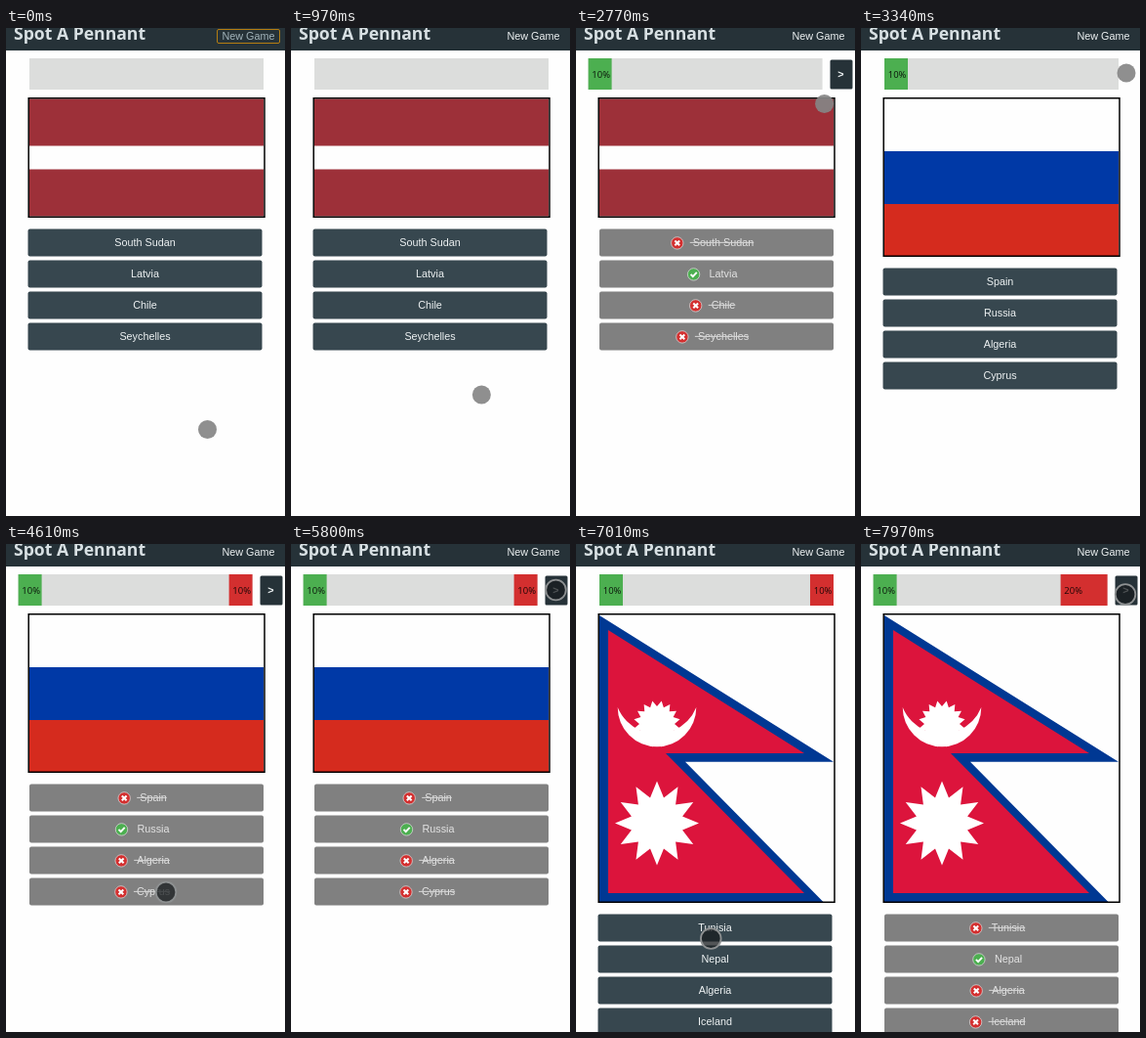
Write an HTML page with a canvas that moves like this. It is 286 by 499 pixels and loops after 8 s.

```html
<!DOCTYPE html>
<html lang="en">
<head>
<meta charset="utf-8">
<title>Flag quiz</title>
<style>
  html, body { margin: 0; width: 100%; height: 100%; overflow: hidden; background: #fefefe; }
  canvas { display: block; width: 286px; height: 499px; }
</style>
</head>
<body>
<canvas id="stage"></canvas>
<script>
const LOOP = 8000;
const HOLD = 250;      // a press stays dark this long, then the pointer leaves
const SETTLE = 130;    // the pointer rests this long before a press
const RESPONSE = 130;  // the page reacts this long after a press
const SANS = '10.8px "Liberation Sans", Arial, sans-serif';
const SMALL = '9.5px "Open Sans", sans-serif';
const GREEN = '#4caf50', RED = '#d32f2f', DARK = '#263238', LIGHT = '#eef2f3';
const FLAG_TOP = 71;

const canvas = document.getElementById('stage');
const ctx = canvas.getContext('2d');
const ratio = window.devicePixelRatio || 1;
canvas.width = 286 * ratio;
canvas.height = 499 * ratio;
ctx.scale(ratio, ratio);

const questions = [
  { flag: drawLatvia, height: 123, names: ['South Sudan', 'Latvia', 'Chile', 'Seychelles'], pick: 'Latvia', correct: 'Latvia' },
  { flag: drawRussia, height: 163, names: ['Spain', 'Russia', 'Algeria', 'Cyprus'], pick: 'Cyprus', correct: 'Russia' },
  { flag: drawNepal, height: 296, names: ['Tunisia', 'Nepal', 'Algeria', 'Iceland'], pick: 'Tunisia', correct: 'Nepal' }
];

// Presses alternate between an answer and the next button.
const presses = [
  { at: 1940, x: 157, y: 254 }, { at: 3090, x: 272, y: 46 },
  { at: 4460, x: 164, y: 356 }, { at: 5690, x: 271.5, y: 47 },
  { at: 7000, x: 138.3, y: 403.5 }, { at: 7960, x: 271, y: 51.5 }
];
const stops = [{ at: -HOLD, x: 206.5, y: 410.5 }, { at: 440, x: 202.5, y: 397.5 }, ...presses];

function pointerAt(time) {
  const from = stops.filter(stop => stop.at <= time).pop();
  const to = stops.find(stop => stop.at > time) || from;
  const start = from.at + HOLD, end = to.at - SETTLE;
  const p = Math.min(1, Math.max(0, (time - start) / (end - start)));
  const ease = p * p * (3 - 2 * p);
  return [from.x + (to.x - from.x) * ease, from.y + (to.y - from.y) * ease];
}

function rect(x, y, w, h, color, radius = 0) {
  ctx.fillStyle = color;
  ctx.beginPath();
  ctx.roundRect(x, y, w, h, radius);
  ctx.fill();
}

function frame(x, y, w, h, color, width, radius = 0) {
  ctx.strokeStyle = color;
  ctx.lineWidth = width;
  ctx.beginPath();
  ctx.roundRect(x, y, w, h, radius);
  ctx.stroke();
}

function text(value, x, y, font, color, align = 'left') {
  ctx.font = font;
  ctx.fillStyle = color;
  ctx.textAlign = align;
  ctx.fillText(value, x, y);
}

function line(points, color, width) {
  ctx.strokeStyle = color;
  ctx.lineWidth = width;
  ctx.beginPath();
  points.forEach(([x, y]) => ctx.lineTo(x, y));
  ctx.stroke();
}

function polygon(points, color) {
  ctx.fillStyle = color;
  ctx.beginPath();
  points.forEach(([x, y]) => ctx.lineTo(x, y));
  ctx.fill();
}

function circle(x, y, r, fill, stroke, width) {
  ctx.beginPath();
  ctx.arc(x, y, r, 0, Math.PI * 2);
  ctx.fillStyle = fill;
  ctx.fill();
  if (stroke) {
    ctx.strokeStyle = stroke;
    ctx.lineWidth = width;
    ctx.stroke();
  }
}

function star(x, y, outer, inner, rays, turn = 0) {
  const points = Array.from({ length: rays * 2 }, (_, i) => {
    const angle = (i + turn) * Math.PI / rays - Math.PI / 2, r = i % 2 ? inner : outer;
    return [x + r * Math.cos(angle), y + r * Math.sin(angle)];
  });
  polygon(points, '#fff');
}

function drawLatvia() {
  rect(24, 72.5, 240, 48, '#9d3039');
  rect(24, 144.4, 240, 48, '#9d3039');
}

function drawRussia() {
  rect(24, 126, 240, 54, '#0039a6');
  rect(24, 180, 240, 53, '#d52b1e');
}

// Crescent with horns level with the outer circle's centre.
function crescent(x, y, radius, depth) {
  const inner = (radius * radius + depth * depth) / (2 * depth);
  const spread = Math.asin(radius / inner);
  ctx.fillStyle = '#fff';
  ctx.beginPath();
  ctx.arc(x, y, radius, 0, Math.PI);
  ctx.arc(x, y + depth - inner, inner, Math.PI / 2 + spread, Math.PI / 2 - spread, true);
  ctx.fill();
}

function drawNepal() {
  polygon([[24, 73], [264, 222.7], [112, 222.7], [253.5, 366], [24, 366]], '#003893');
  polygon([[33, 88], [234, 214], [92, 214], [234, 357], [33, 357]], '#dc143c');
  crescent(83, 167, 40.3, 27);
  star(83, 184, 24, 18, 16, 1);
  star(83, 285.5, 43, 27, 12);
}

function drawHeader(focused) {
  rect(0, 0, 286, 23, DARK);
  text('Spot A Pennant', 8, 12, 'bold 17.6px "Open Sans", sans-serif', '#d8e0e3');
  text('New Game', 248.5, 12, SANS, focused ? '#a3b4bb' : LIGHT, 'center');
  if (focused) frame(216.5, 1.5, 64, 14, '#b47d12', 1, 1.5);
}

function drawProgress(good, bad, answered) {
  const x = answered ? 12.6 : 24, badX = x + 240 - bad * 24;
  rect(x, 31, 240, 32, '#dcdddc');
  if (good) {
    rect(x, 31, good * 24, 32, GREEN);
    text(good * 10 + '%', x + 3.7, 51, SMALL, '#0a140a');
  }
  if (bad) {
    rect(badX, 31, bad * 24, 32, RED);
    text(bad * 10 + '%', badX + 3.7, 51, SMALL, '#1c0606');
  }
  if (answered) {
    rect(260.5, 32.5, 23, 30, DARK, 1.5);
    text('>', 271.5, 51, 'bold ' + SANS, LIGHT, 'center');
  }
}

function drawMark(x, y, correct) {
  circle(x, y, 6.2, correct ? GREEN : RED, '#d5d5d5', 0.8);
  if (correct) {
    line([[x - 3, y], [x - 0.8, y + 2.3], [x + 3.2, y - 2]], '#fff', 1.9);
  } else {
    for (const d of [-2.4, 2.4]) line([[x - d, y - 2.4], [x + d, y + 2.4]], '#fff', 2);
  }
}

function drawOption(name, y, answered, correct) {
  if (!answered) {
    rect(22.5, y, 240, 28, '#37474f', 2);
    text(name, 142.5, y + 17.5, SANS, LIGHT, 'center');
    return;
  }
  rect(24, y, 240, 28, '#808080', 2);
  ctx.font = SANS;
  const width = ctx.measureText(name).width, x = 151 - width / 2;
  text(name, x, y + 17.5, SANS, '#e2e2e2');
  drawMark(x - 16, y + 14.3, correct);
  if (!correct) line([[x - 3, y + 13.8], [x + width, y + 13.8]], '#d6d6d6', 1);
}

function drawPointer(time) {
  const [x, y] = pointerAt(time);
  const pressed = presses.some(({ at }) => time >= at && time < at + HOLD);
  if (pressed) circle(x, y, 10.3, 'rgba(24,28,31,.75)', '#8e9192', 1.8);
  else circle(x, y, 9.5, 'rgba(134,134,134,.92)');
}

function draw(time) {
  const done = presses.filter(({ at }) => time >= at + RESPONSE).length;
  const { flag, height, names, correct } = questions[Math.floor(done / 2)] || questions[0];
  const answered = done % 2 === 1;
  const finished = questions.slice(0, Math.ceil(done / 2));
  const good = finished.filter(q => q.pick === q.correct).length;

  rect(0, 0, 286, 499, '#fefefe');
  drawHeader(time < 150);
  drawProgress(good, finished.length - good, answered);
  flag();
  frame(23.2, FLAG_TOP + 0.8, 241.8, height - 1.5, '#000', 1.5);
  names.forEach((name, i) =>
    drawOption(name, FLAG_TOP + height + 11.6 + i * 32, answered, name === correct));
  drawPointer(time);
}

const began = performance.now();
function tick() {
  draw((performance.now() - began) % LOOP);
  requestAnimationFrame(tick);
}
tick();
</script>
</body>
</html>
```
